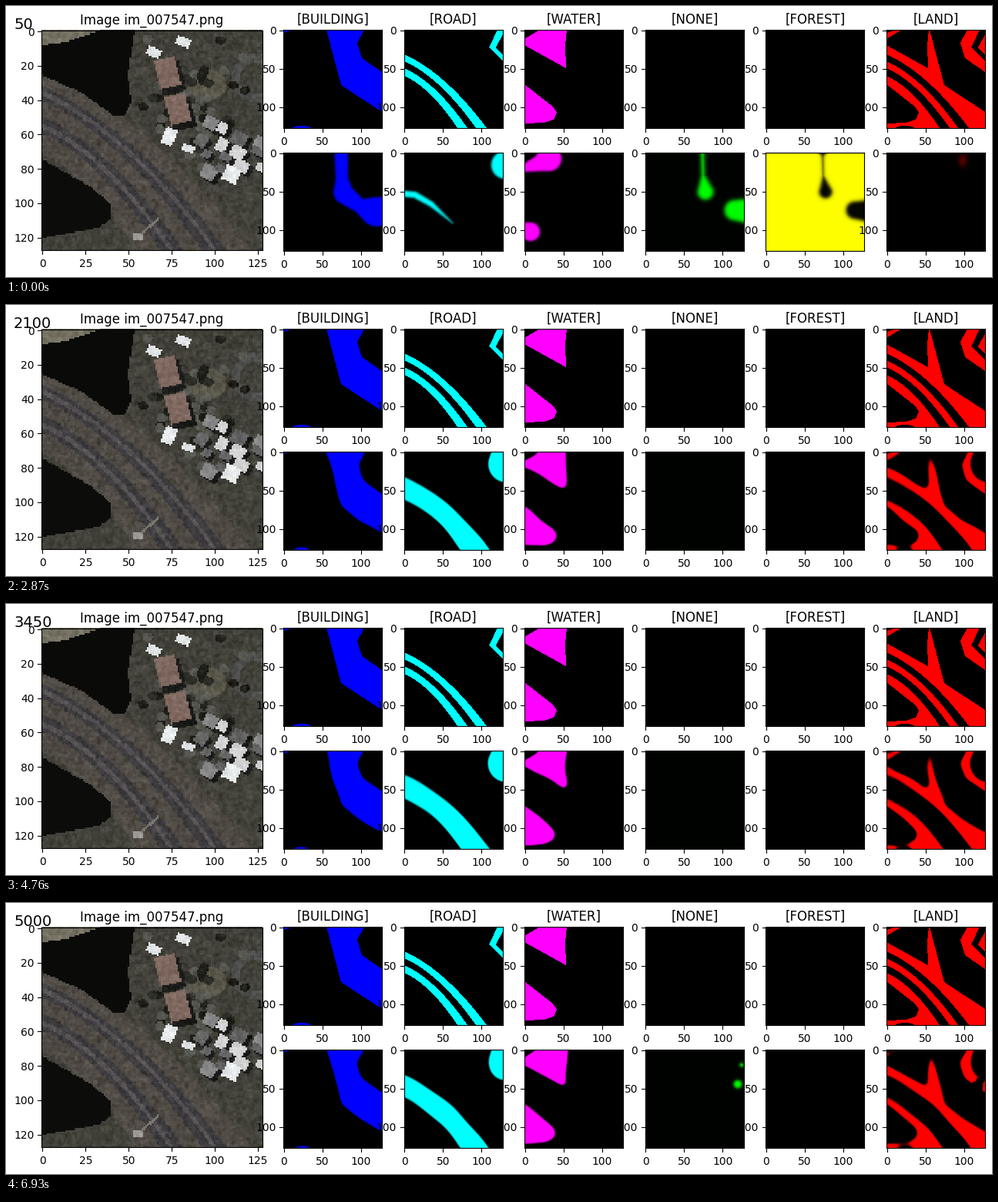
Animation, 1280 px wide and 353 px high, one loop 7 s. Source, as a matplotlib script:

```python
import numpy as np
import matplotlib.pyplot as plt
from matplotlib.animation import FuncAnimation
from matplotlib.collections import LineCollection
from matplotlib.path import Path

W, H, DPI = 1280, 353, 100
N, STEPS = 128, 100
PT = DPI / 72
X, Y = np.meshgrid(np.arange(N) + 0.5, np.arange(N) + 0.5)
GRID = np.column_stack([X.ravel(), Y.ravel()])


# ---------- shapes and fields ----------
def poly(*points):
    return Path(points).contains_points(GRID).reshape(N, N)


def disc(x, y, rx, ry):
    return ((X - x) / rx) ** 2 + ((Y - y) / ry) ** 2 < 1


def curve(start, end):
    """Road edge leaving the left side at y=start, the bottom at x=end."""
    return start + 0.45 * X + (N - start - 0.45 * end) * (X / end) ** 2


def band(upper, lower):
    """Approximate distance inside the strip between two road edges."""
    return 0.7 * np.minimum(Y - curve(*upper), curve(*lower) - Y)


def blur(a, sigma):
    pad = int(4 * sigma)
    a = np.pad(a.astype(float), pad, mode="edge")
    k = np.exp(-2 * (np.pi * sigma * np.fft.fftfreq(len(a))) ** 2)
    return np.fft.ifft2(np.fft.fft2(a) * np.outer(k, k)).real[pad:-pad, pad:-pad]


def field(dist, width=10):
    return np.clip(0.5 + dist / width, 0, 1)


def stroke(*knots):
    """Distance inside a brush line through (x, y, radius) knots."""
    t = np.linspace(0, len(knots) - 1, 40)
    x, y, r = (np.interp(t, range(len(knots)), c) for c in zip(*knots))
    gap = np.hypot(X[..., None] - x, Y[..., None] - y)
    return (r - gap).max(-1)


def squash(f, gain):
    return 1 / (1 + np.exp(-gain * (f - 0.5)))


def tint(value, colour):
    return np.clip(value, 0, 1)[..., None] * np.array(colour, float)


# ---------- labelled masks ----------
lanes = [band((32, 107), (41, 93)) > 0, band((50, 82), (60, 69)) > 0]
building = (poly((56, 0), (105, 0), (96, 17), (102, 37), (128, 55), (128, 107), (75, 72))
            | poly((0, 0), (12, 0), (0, 4)) | disc(24, 130, 14, 5))
road = lanes[0] | lanes[1] | poly((121, 0), (110, 23), (128, 40), (128, 33),
                                  (119, 23), (128, 6), (128, 0))
water = (poly((20, 0), (55, 0), (53, 20), (54, 50), (0, 20), (0, 12))
         | poly((0, 71), (38, 101), (42, 108), (38, 117), (25, 121), (0, 122)))
empty = np.zeros((N, N))
truth = [building, road, water, empty, empty, ~(building | road | water)]

# ---------- predictions: first guess, then the settled answer ----------
first = [
    field(stroke((75, -5, 9), (76, 35, 8), (78, 53, 13), (100, 70, 9), (120, 77, 19), (135, 77, 19))),
    field(np.maximum(stroke((-5, 53, 4), (14, 55, 4), (35, 67, 3.5), (62, 91, 0.5)),
                     stroke((131, 16, 18)))),
    field(np.maximum(stroke((0, 20, 5), (22, 13, 11), (32, 8, 16)), stroke((-2, 101, 10), (8, 103, 12)))),
    field(np.maximum(stroke((74, -5, 2), (75, 30, 2), (78, 51, 10)),
                     stroke((116, 75, 13), (135, 76, 16))), 14),
]
settled = [
    blur(building, 4),
    np.maximum(field(band((32, 111), (61, 73))), field(stroke((131, 13, 20), (131, 18, 22)))),
    blur(water, 4),
    empty,
]
late_green = field(np.maximum(stroke((125, 20, 2)), stroke((120, 45, 5))))
forest_guess = (1 - 0.8 * first[3]) * (1 - 0.6 * np.exp(-Y / 2.5))
red_spot = 0.35 * np.exp(-((X - 99) ** 2 / 30 + (Y - 10) ** 2 / 70))


def ripple(rng):
    a, b = rng.uniform(-0.12, 0.12, (2, 4))
    phase = rng.uniform(0, 2 * np.pi, 4)
    return sum(np.sin(i * X + j * Y + p) for i, j, p in zip(a, b, phase)) / 4


def predict(n):
    early = max(0, 1 - n / 25) ** 3
    rng = np.random.default_rng(n)
    b, r, w, e = (early * f + (1 - early) * s for f, s in zip(first, settled))
    w = w * (1 - np.exp(-((n - 57) / 4) ** 2))
    e = e + late_green * np.clip((n - 94) / 5, 0, 1)
    b, r, w = (f + (1 - early) * f * (1 - f) * ripple(rng) for f in (b, r, w))
    forest = early * forest_guess
    land = 1 - b - r - w - e - early * (1 - first[3])
    gain = 22 - 10 * early
    return [squash(b, gain), squash(r, gain), squash(w, gain), squash(e, 9),
            squash(forest, 12), squash(land, gain) * (1 - early) + red_spot * early]


# ---------- aerial picture ----------
def aerial():
    rng = np.random.default_rng(7)
    img = np.full((N, N, 3), (66, 65, 58), float)

    def paint(mask, *rgb):
        img[mask] = rgb

    def block(x, y, w, h, angle, *rgb):
        c, s = np.cos(angle), np.sin(angle)
        u, v = (X - x) * c + (Y - y) * s, (Y - y) * c - (X - x) * s
        paint((abs(u) < w / 2) & (abs(v) < h / 2), *rgb)

    paint(band((22, 122), (72, 55)) > 0, 80, 76, 69)
    for lane in lanes:
        paint(lane, 62, 60, 62)
    paint(abs(band((36, 101), (37, 100))) < 0.8, 84, 82, 82)
    paint(abs(band((55, 76), (56, 75))) < 0.8, 84, 82, 82)
    ring = np.hypot(X - 124, Y - 28)
    paint((ring > 9) & (ring < 14), 80, 80, 78)
    paint(disc(96, 32, 11, 9), 88, 85, 73)
    for x, y in rng.normal((92, 50), (18, 22), (60, 2)):
        if y < 0.9 * x and x > 58:
            shade = rng.choice([32, 46, 88])
            paint(disc(x, y, 3, 2.5), shade, shade, shade - 6)
    paint(poly((0, 0), (36, 0), (16, 7), (0, 9)), 118, 114, 100)
    paint(poly((0, 9), (15, 7), (36, 0), (54, 0), (50, 26), (52, 42), (48, 50),
               (42, 50), (24, 37), (0, 26)), 10, 10, 8)
    paint(poly((0, 75), (28, 91), (40, 101), (40, 110), (33, 115), (0, 121)), 12, 12, 10)

    for x, y in [(73, 25), (79, 46)]:
        block(x + 2, y + 3, 14, 18, -0.25, 28, 28, 26)
        block(x, y, 12, 17, -0.25, 126, 104, 95)
    # rows of pale houses with shadows on the right
    for k in range(14):
        x, y = 96 + 10 * (k % 4) + rng.normal(0, 2), 54 + 9 * (k // 4) + 3 * (k % 4) + rng.normal(0, 2)
        w, h = rng.uniform(4, 9, 2)
        block(x + 2, y + 2, w, h, 0.5, 26, 26, 26)
        block(x, y, w, h, 0.5, *[rng.choice([100, 135, 210])] * 3)
    for x, y, w, h in [(65, 13, 8, 5), (82, 7, 8, 5), (74, 62, 7, 10), (85, 69, 7, 4), (110, 84, 9, 9)]:
        block(x, y, w, h, 0.4, 228, 232, 232)
    block(56, 120, 6, 5, 0, 150, 148, 142)
    block(63, 114, 14, 1.5, -0.7, 125, 122, 115)
    grain = blur(rng.normal(0, 14, (N, N)), 0.6)
    img += (grain * (img.mean(-1) > 20))[..., None]
    return np.clip(img / 255, 0, 1)


# ---------- stage ----------
fig = plt.figure(figsize=(W / DPI, H / DPI), dpi=DPI, facecolor="white")
ax = fig.add_axes([0, 0, 1, 1])
ax.axis("off")
lines = []


def panel(img, left, top, size, xticks, yticks, title=""):
    right, bottom, unit = left + size, top + size, size / N
    art = ax.imshow(img, extent=(left, right, bottom, top), aspect="auto",
                    interpolation="nearest")
    tick, gap = 3.5 * PT, 7 * PT
    lines.extend([[(left, top), (right, top)], [(left, bottom), (right, bottom)],
                  [(left, top), (left, bottom)], [(right, top), (right, bottom)]])
    for v in xticks:
        x = left + (v + 0.5) * unit
        lines.append([(x, bottom), (x, bottom + tick)])
        ax.text(x, bottom + gap + 1, str(v), ha="center", va="top", fontsize=10)
    for v in yticks:
        y = top + (v + 0.5) * unit
        lines.append([(left - tick, y), (left, y)])
        ax.text(left - gap, y, str(v), ha="right", va="center_baseline", fontsize=10)
    ax.text(left + size / 2, top - 6 * PT, title, ha="center", fontsize=12)
    return art


panel(aerial(), 46.3, 32.1, 286.3, range(0, 126, 25), range(0, 121, 20),
      "Image im_007547.png")

CLASSES = [("BUILDING", (0, 0, 1)), ("ROAD", (0, 1, 1)), ("WATER", (1, 0, 1)),
           ("NONE", (0, 1, 0)), ("FOREST", (1, 1, 0)), ("LAND", (1, 0, 0))]
marks = (0, 50, 100)
preds = []
for i, (name, colour) in enumerate(CLASSES):
    left = 360.2 + 156.56 * i
    panel(tint(truth[i], colour), left, 31.1, 128, marks, marks, f"[{name}]")
    preds.append(panel(tint(empty, colour), left, 191.4, 128, marks, marks))

ax.add_collection(LineCollection(lines, colors="black", linewidths=0.8,
                                 capstyle="projecting", snap=True, zorder=2.5))
counter = ax.text(10, 30, "", fontsize=14)
ax.set_xlim(0, W)
ax.set_ylim(H, 0)


def update(n):
    counter.set_text(str(50 * (n + 1)))
    for art, value, (_, colour) in zip(preds, predict(n), CLASSES):
        art.set_data(tint(value, colour))
    return [counter, *preds]


anim = FuncAnimation(fig, update, frames=STEPS, interval=70, repeat=True)
plt.show()
```
